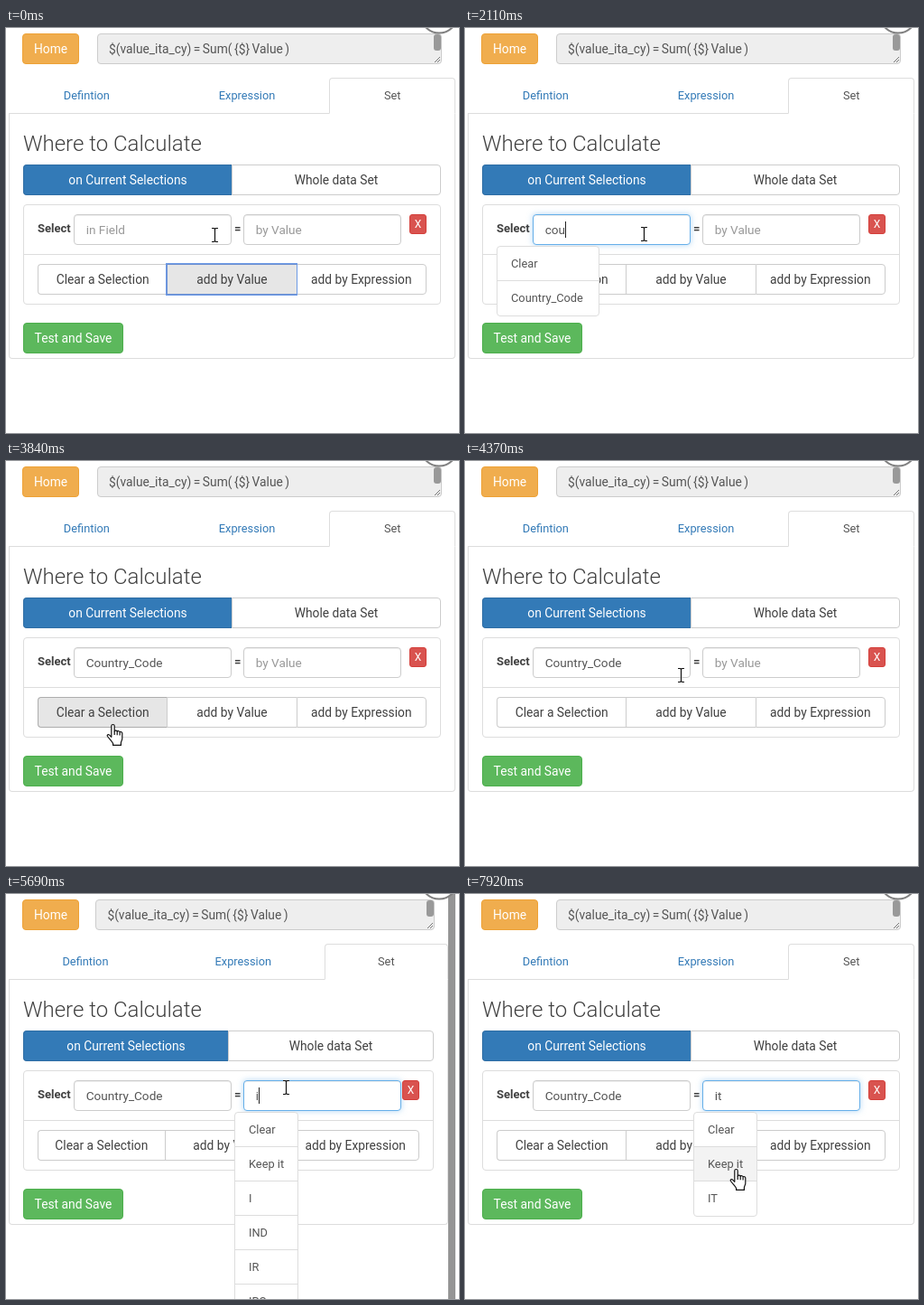
An HTML page that plays this animation: 502 by 448 pixels, repeating every 8 s.

```html
<!DOCTYPE html>
<html lang="en">
<head>
<meta charset="utf-8">
<title>Where to Calculate</title>
<style>
* { box-sizing: border-box; }
html, body { margin: 0; width: 100%; height: 100%; overflow: hidden; background: #fff; }
body { position: relative; font: 13.8px/18px Roboto, sans-serif; color: #404040; white-space: pre; }
#page { position: absolute; left: 0; top: 0; width: 498px; height: 448px; overflow: hidden; }
#page.narrow { width: 490px; }
#page > *, .abs { position: absolute; }
.box { border: 1px solid #ddd; border-radius: 4px; }
.btn { display: flex; align-items: center; justify-content: center; height: 34px;
  border: 1px solid #ccc; border-radius: 4px; background: #fff; }
.solid { color: #fff; }
#home { left: 18px; top: 6px; width: 63px; background: #f0ad4e; border-color: #eea236; }
#save { left: 19px; top: 326px; width: 111px; background: #5cb85c; border-color: #4cae4c; }
#formula { left: calc(20% + 1.4px); right: 15px; top: 6px; height: 34px; padding: 7px 12px;
  background: #eee; border: 1px solid #ccc; border-radius: 4px; color: #555; word-spacing: -.9px; }
#formula i { position: absolute; right: 0; top: 0; width: 8px; height: 18px; background: #999; border-radius: 3px; }
#formula svg { position: absolute; right: 0; bottom: 0; }
#tabs { left: 3px; right: 0; top: 55px; height: 40px; display: flex; font-size: 12.8px; color: #337ab7; }
#tabs div { display: flex; align-items: center; justify-content: center; border-bottom: 1px solid #ddd; }
#tabs .on { color: #555; border: 1px solid #ddd; border-bottom-color: #fff; border-radius: 4px 4px 0 0; }
#panel { left: 3px; right: 0; top: 94px; height: 272px; border-radius: 0 0 4px 4px; border-top: 0; }
h3 { margin: 0; left: 19px; top: 114px; font-weight: 300; font-size: 24px; line-height: 28px; }
.group { display: flex; height: 34px; }
.group .btn { flex: 1 1 0; border-radius: 0; }
.group .btn:not(:last-child) { border-right: 0; }
.group .btn:first-child { border-radius: 4px 0 0 4px; }
.group .btn:last-child { border-radius: 0 4px 4px 0; }
#scope { left: 19px; right: 16px; top: 151px; }
#scope .solid { background: #337ab7; border-color: #2e6da4; }
#list { left: 19px; right: 16px; top: 195px; height: 111px; }
#list i { position: absolute; left: 0; right: 0; top: 54px; height: 1px; background: #ddd; }
#adds { left: 35px; right: 32px; top: 261px; }
#adds .hover { background: #e6e6e6; border-color: #adadad; }
#adds .focus { background: #e6e6e6; border-color: #6d90d0; box-shadow: 0 0 0 1px #6d9ae6; z-index: 1; }
b { top: 213px; font-size: 13px; }
#del { right: 32px; top: 206px; width: 19px; height: 22px; font-size: 12px;
  background: #d9534f; border-color: #d43f3a; border-radius: 3px; }
.input { --f: 0; top: 206px; width: 175px; height: 34px; padding: 0 12.7px; display: flex; align-items: center;
  border: 1px solid color-mix(in srgb, #66afe9 calc(var(--f) * 100%), #ccc); border-radius: 4px;
  background: #fff; color: #555; font-size: 13.6px;
  box-shadow: inset 0 1px 1px rgba(0,0,0,.075), 0 0 6px rgba(102,175,233,calc(var(--f) * .5)); }
.input i { width: 1px; height: 18px; margin-right: -1px; background: #222; }
.input u { color: #999; text-decoration: none; }
.menu { top: 241px; background: #fff; font-size: 12.8px; color: #555; overflow: hidden; }
.menu div { height: 38px; padding: 0 15px; line-height: 37px; border-bottom: 1px solid #ddd; }
.menu div:last-child { border-bottom: 0; }
.menu .on { background: #f3f3f3; }
#bar { left: 490px; top: 0; width: 8px; height: 448px; background: #959595; }
#over { left: 0; top: 0; }
</style>
</head>
<body>
<div id="page">
  <div id="home" class="btn solid">Home</div>
  <div id="formula">$(value_ita_cy) = Sum( {$} Value )<i></i><svg width="8" height="8" stroke="#777"><path d="M1 7L7 1M4 7L7 4"/></svg></div>
  <div id="panel" class="box"></div>
  <div id="tabs"><div style="width:34.9%">Defintion</div><div style="width:36.9%">Expression</div><div class="on" style="width:28.2%">Set</div></div>
  <h3>Where to Calculate</h3>
  <div id="scope" class="group"><div class="btn solid">on Current Selections</div><div class="btn">Whole data Set</div></div>
  <div id="list" class="box"><i></i></div>
  <b style="left:35px">Select</b>
  <div id="field" class="input" style="left:75px"><span></span><i></i><u>in Field</u></div>
  <b style="left:253px">=</b>
  <div id="value" class="input" style="left:263px"><span></span><i></i><u>by Value</u></div>
  <div id="del" class="btn solid">X</div>
  <div id="adds" class="group"><div class="btn">Clear a Selection</div><div class="btn">add by Value</div><div class="btn">add by Expression</div></div>
  <div id="save" class="btn solid">Test and Save</div>
  <div id="fieldMenu" class="menu box" style="left:35px;width:114px"></div>
  <div id="valueMenu" class="menu box" style="left:253px;width:71px"></div>
</div>
<div id="bar" class="abs"></div>
<svg id="over" class="abs" width="502" height="448">
  <circle cx="480" cy="-15" r="20.5" fill="#fff" stroke="#808080" stroke-width="2"/>
  <g id="beam" fill="none">
    <path d="M-3 -7.5H-1L0 -6.5L1 -7.5H3M0 -7V7M-3 7.5H-1L0 6.5L1 7.5H3" stroke="#fff" stroke-width="2.4" opacity=".6"/>
    <path d="M-3.5 -7.5H-1L0 -6.5L1 -7.5H3.5M0 -7V7M-3.5 7.5H-1L0 6.5L1 7.5H3.5" stroke="#111" stroke-width="1.2"/>
  </g>
  <g id="hand" stroke="#111" stroke-width="1.2" stroke-linejoin="round">
    <path fill="#fff" d="M-1.2 2.2a1.7 1.7 0 0 1 3.4 0V8a1.6 1.6 0 0 1 3 .4a1.6 1.6 0 0 1 2.9 .8a1.5 1.5 0 0 1 2.7 1V16c0 2-1.4 3-1.4 5v2.4H.6V21.5C-.5 19-3.6 16.5-5.6 13.5c-.8-1.6 1-2.6 2.2-1.4L-1.2 14.3Z"/>
    <path fill="none" d="M2.2 8v4M5.2 8.6v3.6M8.1 9.6v3"/>
  </g>
</svg>
<script>
const LOOP = 8000;
const $ = id => document.getElementById(id);
const countries = ['Clear', 'Keep it', 'I', 'IND', 'IR', 'IRQ'];
const fields = ['Clear', 'Country_Code'];

const beam = (x, y) => ({ shape: 'beam', x, y });
const hand = (x, y) => ({ shape: 'hand', x, y });

// Each step changes part of the state from its time on.
const steps = [
  [0, { ...beam(231.5, 229), field: '', value: '', glowF: 0, glowV: 0, caret: '', add: 'focus', addAt: 1,
        menuF: [], menuV: [], hover: -1, narrow: false }],
  [120, beam(206.5, 228)],
  [240, beam(198.5, 228)],
  [380, { add: '', glowF: .4, caret: 'field' }],
  [530, { glowF: 1 }],
  [1060, { caret: '' }],
  [1570, { field: 'c', caret: 'field' }],
  [1720, { field: 'co' }],
  [1980, { field: 'cou' }],
  [2110, { menuF: fields }],
  [2260, { field: 'coun' }],
  [2790, { caret: '' }],
  [3160, beam(184.5, 235)],
  [3300, { ...hand(139, 284), caret: 'field', hover: 1 }],
  [3430, hand(118, 291)],
  [3710, { field: 'Country_Code', menuF: [], hover: -1, caret: '', glowF: .5, add: 'hover', addAt: 0 }],
  [3840, { glowF: 0 }],
  [4230, hand(162, 274)],
  [4370, { ...beam(239.5, 237), add: '' }],
  [4490, beam(266.5, 229)],
  [4610, beam(294.5, 219)],
  [4730, beam(310.5, 214)],
  [4880, { glowV: 1, caret: 'value' }],
  [5530, { value: 'i' }],
  [5690, { menuV: countries, narrow: true }],
  [6200, { caret: '' }],
  [6700, { caret: 'value' }],
  [7010, { value: 'it' }],
  [7140, { menuV: ['Clear', 'Keep it', 'IT'], narrow: false }],
  [7640, { caret: '' }],
  [7790, { ...hand(307, 284), hover: 1 }],
  [7920, hand(300, 304)]
];

function drawInput(id, text, glow, caret) {
  const el = $(id), [span, bar, hint] = el.children;
  el.style.setProperty('--f', glow);
  span.textContent = text;
  bar.style.visibility = caret === id ? 'visible' : 'hidden';
  hint.hidden = text !== '';
}

function drawMenu(id, items, hover) {
  const el = $(id);
  el.style.display = items.length ? 'block' : 'none';
  el.replaceChildren(...items.map((name, i) => {
    const row = document.createElement('div');
    row.textContent = name;
    row.classList.toggle('on', i === hover);
    return row;
  }));
}

function draw(s) {
  $('page').classList.toggle('narrow', s.narrow);
  $('bar').hidden = !s.narrow;
  drawInput('field', s.field, s.glowF, s.caret);
  drawInput('value', s.value, s.glowV, s.caret);
  drawMenu('fieldMenu', s.menuF, s.hover);
  drawMenu('valueMenu', s.menuV, s.hover);
  [...$('adds').children].forEach((b, i) => b.className = 'btn ' + (i === s.addAt ? s.add : ''));
  for (const id of ['beam', 'hand']) {
    $(id).setAttribute('transform', `translate(${s.x} ${s.y})`);
    $(id).style.display = s.shape === id ? '' : 'none';
  }
}

const start = performance.now();
let shown = 0;
function tick() {
  const t = (performance.now() - start) % LOOP;
  const past = steps.filter(([at]) => at <= t);
  if (past.length !== shown) {
    shown = past.length;
    draw(Object.assign({}, ...past.map(p => p[1])));
  }
  requestAnimationFrame(tick);
}
tick();
</script>
</body>
</html>
```
